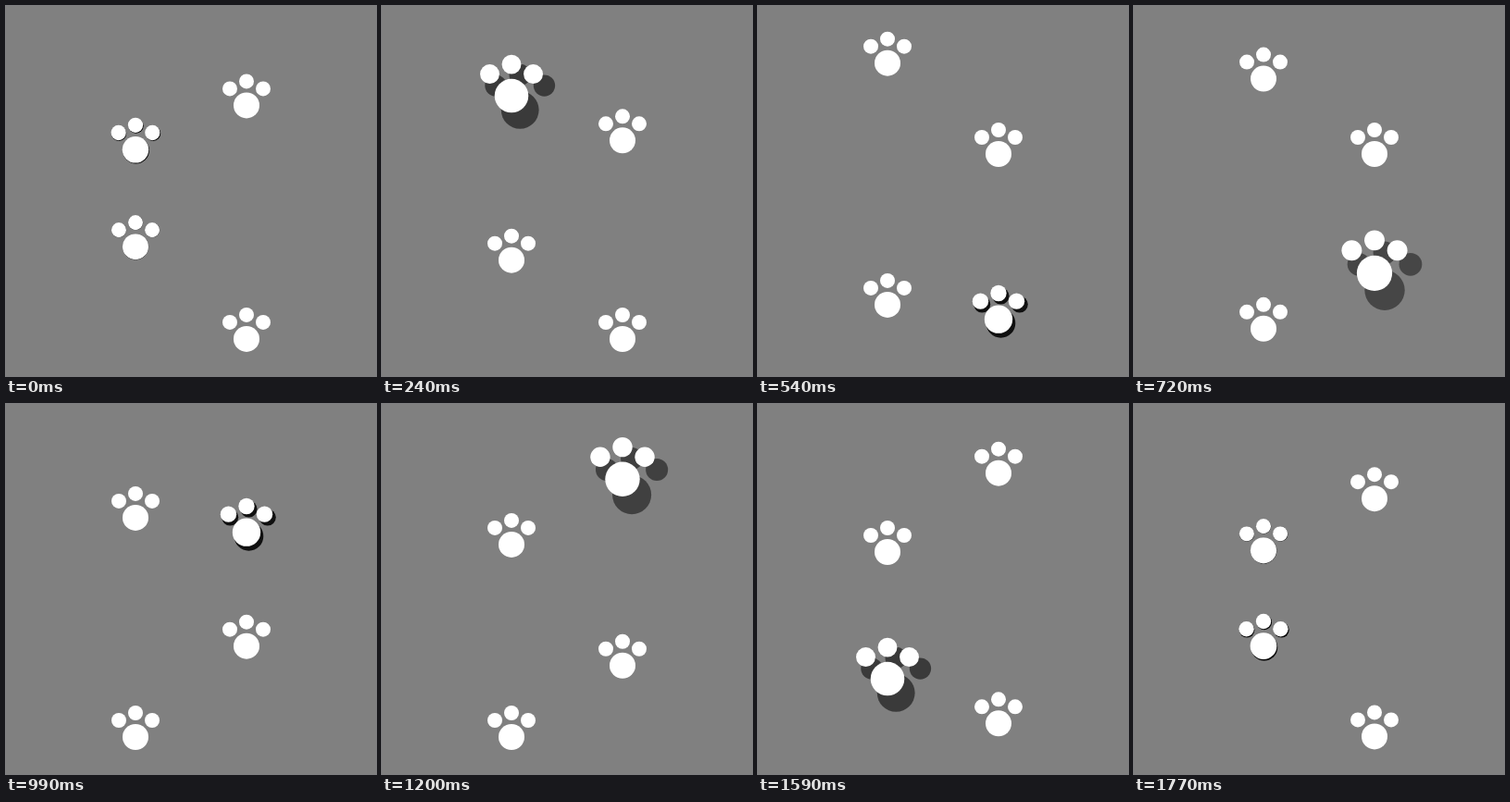
These frames come from a looping animation (400x400 px, 1.8 s). An HTML page:

```html
<!DOCTYPE html>
<html lang="en">
<head>
<meta charset="utf-8">
<title>Walking paws</title>
<style>
  html, body { margin: 0; width: 100%; height: 100%; overflow: hidden; background: #808080; }
  svg { display: block; width: 100vw; height: 100vh; }
</style>
</head>
<body>
<svg id="stage" viewBox="0 0 400 400"></svg>
<script>
const NS = "http://www.w3.org/2000/svg";
const PERIOD = 1800;
const START = 75;      // ms already elapsed in the first paw's step
const STRIDE = 100;
const LIFT_END = 0.3, PEAK = 0.2, SLIDE_END = 0.8;

// x, y of the pad at the front of the stride, delay as a share of the cycle
const paws = [
  { x: 140, y: 60, delay: 0 },
  { x: 260, y: 260, delay: 0.25 },
  { x: 260, y: 60, delay: 0.5 },
  { x: 140, y: 260, delay: 0.75 },
];

const stage = document.getElementById("stage");

function add(parent, tag, attrs) {
  const node = document.createElementNS(NS, tag);
  for (const name in attrs) node.setAttribute(name, attrs[name]);
  return parent.appendChild(node);
}

function pawShape(fill) {
  const group = add(stage, "g", { fill });
  add(group, "circle", { r: 14 });
  for (const [cx, cy] of [[-18, -18], [0, -26], [18, -18]])
    add(group, "circle", { cx, cy, r: 8 });
  return group;
}

for (const paw of paws) {
  paw.shadow = pawShape("#000");
  paw.body = pawShape("#fff");
}

const easeSine = x => (1 - Math.cos(Math.PI * x)) / 2;

// Distance behind the front of the stride, 0 to 1
function offsetAt(p) {
  if (p < LIFT_END) return 1 - easeSine(p / LIFT_END);
  if (p < SLIDE_END) return easeSine((p - LIFT_END) / (SLIDE_END - LIFT_END));
  return 1;
}

// Height above the ground, 0 to 1
function heightAt(p) {
  if (p < PEAK) return (p / PEAK) ** 2;
  if (p < LIFT_END) return ((LIFT_END - p) / (LIFT_END - PEAK)) ** 2;
  return 0;
}

function place(node, x, y, scale) {
  node.setAttribute("transform", `translate(${x} ${y}) scale(${scale})`);
}

function render(time) {
  for (const { x, y, delay, shadow, body } of paws) {
    const p = ((time + START) / PERIOD + 1 - delay) % 1;
    const z = heightAt(p);
    const padY = y + STRIDE * offsetAt(p);
    place(body, x, padY, 1 + 0.4 * z);
    place(shadow, x + 12 * z, padY + 20 * z, 1 + 0.6 * z);
    shadow.setAttribute("opacity", z > 0 ? 1 - 0.6 * z : 0);
  }
}

let begin;
function tick(now) {
  begin ??= now;
  render((now - begin) % PERIOD);
  requestAnimationFrame(tick);
}
render(0);
requestAnimationFrame(tick);
</script>
</body>
</html>
```
